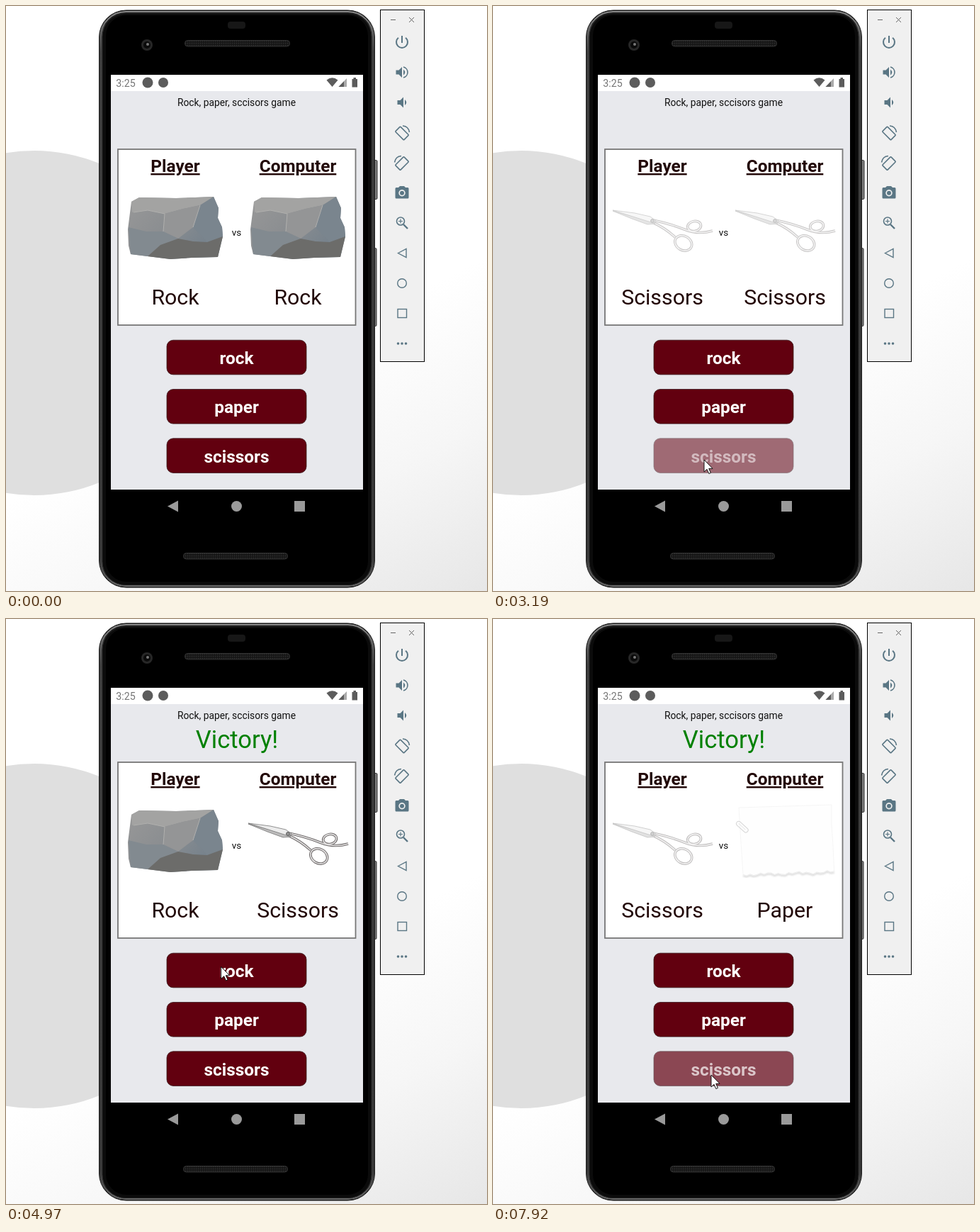
Recreate the animation shown at these times as an HTML page. Size 679x825 px, loop 8 s.

```html
<!DOCTYPE html>
<html lang="en">
<head>
<meta charset="utf-8">
<title>Rock, paper, scissors</title>
<style>
html, body { margin: 0; width: 100%; height: 100%; overflow: hidden; background: #fff; }
svg { display: block; width: 679px; height: 825px; }
text { font-family: Roboto, "Open Sans", sans-serif; text-anchor: middle; fill: #111; }
.head { font-size: 24.4px; font-weight: 700; text-decoration: underline; fill: #220808; }
.button text { font-size: 24.4px; font-weight: 700; fill: #fff; }
.button rect { fill: #62000f; stroke: #2b0c12; stroke-width: .7; }
.pick { font-size: 30.3px; fill: #220808; }
.line { fill: none; stroke: #5a7684; stroke-width: 1.6; }
.solid { fill: #5a7684; }
</style>
</head>
<body>
<svg viewBox="0 0 679 825">
  <defs>
    <linearGradient id="wall" gradientUnits="userSpaceOnUse" x1="530" y1="430" x2="720" y2="800">
      <stop offset="0" stop-color="#fff"/><stop offset=".5" stop-color="#f6f6f6"/><stop offset="1" stop-color="#e7e7e7"/>
    </linearGradient>
    <linearGradient id="rim">
      <stop offset="0" stop-color="#333"/><stop offset=".012" stop-color="#505050"/>
      <stop offset=".025" stop-color="#161616"/><stop offset=".975" stop-color="#161616"/>
      <stop offset=".988" stop-color="#505050"/><stop offset="1" stop-color="#333"/>
    </linearGradient>
    <linearGradient id="shine" x2="0" y2="1">
      <stop offset="0" stop-color="#8a8a8a"/><stop offset=".07" stop-color="#3c3c3c"/>
      <stop offset=".95" stop-color="#343434"/><stop offset="1" stop-color="#6a6a6a"/>
    </linearGradient>
    <linearGradient id="stone" x2="1" y2=".6">
      <stop offset="0" stop-color="#989898"/><stop offset=".5" stop-color="#8b8e91"/><stop offset="1" stop-color="#73808b"/>
    </linearGradient>
    <pattern id="mesh" width="3" height="3" patternUnits="userSpaceOnUse">
      <rect width="3" height="3" fill="#161616"/><circle cx="1.5" cy="1.5" r=".8" fill="#333"/>
    </pattern>
    <filter id="soft"><feGaussianBlur stdDeviation="1"/></filter>

    <g id="Rock">
      <path fill="url(#stone)" d="M177 276 188 270 240 271 293 269 300 285 299 299 305 312 306 325 299 354 262 355 232 357 200 353 176 350 173 338 172 315Z"/>
      <path fill="#a3a3a2" d="M177 276 188 270 240 271 293 269 274 281 250 286 224 293 200 288 178 291Z"/>
      <path fill="#949596" d="M224 293 250 286 274 281 264 312 243 328 222 318Z"/>
      <path fill="#7a858e" d="M274 281 293 269 300 285 299 299 305 312 306 325 284 333 264 312Z"/>
      <path fill="#828a90" d="M173 312 198 318 222 318 243 328 218 337 200 353 176 350Z"/>
      <path fill="#6c6c6a" d="M200 353 218 337 243 328 264 332 284 333 306 325 299 354 262 355 232 357Z"/>
      <path fill="none" stroke="#b0b0ae" d="M180 291 200 288 224 293 222 318M264 312 274 281"/>
    </g>
    <g id="Paper">
      <path class="torn" fill="none" stroke="#aaa" stroke-width="2.5" filter="url(#soft)" transform="translate(0 1.5)"/>
      <path id="sheet" fill="#fefefe" stroke="#e9e9e9"/>
      <path class="torn" fill="none" stroke="#d2d2d2" stroke-width=".8"/>
      <g fill="none" stroke="#a0a0a0" transform="rotate(42 179 293)">
        <rect x="169" y="290" width="20" height="6.5" rx="3.2"/><path d="M172 293H185" stroke="#ccc"/>
      </g>
    </g>
    <path id="arms" d="M226 302Q250 307 270 315T310 317M225 305Q243 313 257 326"/>
    <g id="rings">
      <ellipse cx="284" cy="310.500" rx="9.500" ry="7" transform="rotate(-12 284 310)"/>
      <ellipse cx="269" cy="334.500" rx="12.500" ry="10" transform="rotate(30 269 334)"/>
    </g>
    <g id="Scissors" fill="none">
      <g stroke="#6f6b6b" stroke-width="3.6"><use href="#arms"/><use href="#rings"/></g>
      <g stroke="#e4e2e2" stroke-width="1.6"><use href="#arms"/><use href="#rings"/></g>
      <path fill="#bdbcbc" stroke="#777" stroke-width=".8" d="M169 289 196 300 218 308 229 307 222 303Z"/>
      <path fill="#ececec" stroke="#777" stroke-width=".8" d="M169 288 200 292 222 297 230 303 226 306Z"/>
      <circle cx="225" cy="303" r="2.4" fill="#999" stroke="#555"/>
    </g>
  </defs>

  <rect width="679" height="825" fill="url(#wall)"/>
  <circle cx="40" cy="447" r="243" fill="#dfdfdf"/>

  <!-- phone -->
  <g fill="#808080" stroke="#2c2c2c">
    <rect x="517" y="217.500" width="7" height="55" rx="1.500"/>
    <rect x="517" y="341.500" width="6" height="110" rx="1.500"/>
    <path d="M520.500 566V604"/>
  </g>
  <rect x="131.500" y="6" width="389" height="814" rx="38" fill="url(#rim)" stroke="#1c1c1c"/>
  <rect x="133.500" y="8" width="385" height="810" rx="36" fill="none" stroke="url(#shine)" stroke-width="2"/>
  <rect x="136" y="10.500" width="380" height="806" rx="33" fill="#0b0b0b" stroke="#222"/>
  <rect x="141" y="13" width="370" height="799" rx="29"/>
  <rect x="313" y="22" width="25" height="10" rx="4" fill="#171717"/>
  <rect x="252.500" y="48.500" width="148" height="8.500" rx="4" fill="url(#mesh)" stroke="#333"/>
  <rect x="250.500" y="771.500" width="147" height="8.500" rx="4" fill="url(#mesh)" stroke="#333"/>
  <circle cx="199" cy="55" r="8" fill="#272727"/><circle cx="199" cy="55" r="5" fill="#0a0a0a"/>
  <circle cx="200" cy="54" r="2" fill="#777"/>
  <g fill="#9a9a9a">
    <path d="M228 705.500 243 697.500V713.500Z"/><circle cx="325.500" cy="705.500" r="7.500"/>
    <rect x="407" y="698" width="15" height="15"/>
  </g>

  <!-- app -->
  <rect x="148" y="97" width="356" height="585" fill="#e8e9ed"/>
  <rect x="148" y="97" width="356" height="23" fill="#fff"/>
  <text x="169" y="113.500" font-size="14.200" style="fill:#757575">3:25</text>
  <g fill="#5c5c5c">
    <circle cx="200" cy="108" r="7.500"/><circle cx="222" cy="108" r="7"/>
    <path d="M452.500 104.500Q460.500 98 468.500 104.500L460.500 114Z"/>
    <path d="M469.500 114H481V102Z" fill="#aaa"/><path d="M469.500 114H477V106.300Z"/>
    <path d="M488.500 103H490.500V101H494V103H496V114.500H488.500Z"/>
  </g>
  <text x="325.500" y="140.500" font-size="13.840">Rock, paper, sccisors game</text>
  <text id="result" x="326" y="181.500" font-size="34.600" style="fill:#008000">Victory!</text>
  <rect x="158" y="202" width="335.500" height="248" fill="#fff" stroke="#777" stroke-width="1.800"/>
  <text class="head" x="239" y="234">Player</text>
  <text class="head" x="412" y="234">Computer</text>
  <text x="325.500" y="324" font-size="13.500">vs</text>
  <use class="photo"/><use class="photo" x="173"/>
  <text class="pick" x="239" y="421"></text>
  <text class="pick" x="412" y="421"></text>
  <g id="buttons"></g>

  <!-- emulator panel -->
  <rect x="528.500" y="5.500" width="62" height="496" fill="#f0f0f0" stroke="#000"/>
  <path stroke="#666" fill="none" d="M543 19.500H550M569 16 576 23M576 16 569 23"/>
  <path class="line" transform="translate(559 51)" style="stroke-width:2" d="M0-9V1M-5.100-6.200A8 8 0 1 0 5.100-6.200"/>
  <g transform="translate(559 93.500)">
    <path class="solid" d="M-8.500-3H-4.500L0-7.500V7.500L-4.500 3H-8.500ZM2-4Q6.500 0 2 4Z"/>
    <path class="line" d="M2-7.500A7.700 7.700 0 0 1 2 7.500"/>
  </g>
  <path class="solid" transform="translate(559 136)" d="M-6.500-3H-2.500L2-7.500V7.500L-2.500 3H-6.500ZM4-4Q8.500 0 4 4Z"/>
  <g id="turn" class="line">
    <rect x="-5" y="-8.500" width="10" height="17" rx="1" transform="translate(559 179.500) rotate(-45)"/>
    <path d="M560 169Q568 169.500 569.500 178"/>
  </g>
  <use href="#turn" transform="translate(1118 42.500) scale(-1 1)"/>
  <g transform="translate(559 263)">
    <path class="solid" d="M-3-9H3L5-7H8Q9.500-7 9.500-5.500V7Q9.500 8.500 8 8.500H-8Q-9.500 8.500-9.500 7V-5.500Q-9.500-7-8-7H-5Z"/>
    <circle cy=".8" r="4.700" fill="#f0f0f0"/><circle class="solid" cy=".8" r="3"/>
  </g>
  <g class="line">
    <circle cx="557" cy="303.500" r="5.500"/><path d="M561 308 567 314" style="stroke-width:2.400"/>
    <path d="M554 303.500H560M557 300.500V306.500" style="stroke-width:1.200"/>
    <path d="M553.500 348.500 565 342.500V354.500Z" style="stroke-width:1.400"/>
    <circle cx="559" cy="391" r="6.300" style="stroke-width:1.400"/>
    <rect x="553" y="427.500" width="12.500" height="12" style="stroke-width:1.400"/>
  </g>
  <g class="solid"><circle cx="553.500" cy="476" r="1.800"/><circle cx="559" cy="476" r="1.800"/><circle cx="564.500" cy="476" r="1.800"/></g>

  <path id="cursor" d="M0 0V17L4 13.300 6.800 19.500 9.400 18.400 6.700 12.300H12Z" fill="#fff" stroke="#000" stroke-width=".9"/>
</svg>
<script>
const LOOP = 8000, TICK = 77.25, PHASE = 880;
const all = s => [...document.querySelectorAll(s)];
const id = s => document.getElementById(s);
const clamp = v => Math.min(1, Math.max(0, v));
const ease = v => (v = clamp(v)) < .5 ? 2 * v * v : 1 - 2 * (1 - v) ** 2;

// press: touch down, set: choice shown, out: button released, load: pictures fade in
const clicks = [
  { button: 1, press: 1503, set: 1590, out: 1590, load: 1685, picks: ['Paper', 'Paper'] },
  { button: 2, press: 2930, set: 3082, out: 3082, load: 3085, picks: ['Scissors', 'Scissors'] },
  { button: 0, press: 4090, set: 4243, out: 4243, load: 4250, picks: ['Rock', 'Scissors'], win: true },
  { button: 1, press: 5785, set: 5800, out: 5915, load: 5815, picks: ['Paper', 'Rock'], win: true },
  { button: 2, press: 7590, set: 7770, out: 7770, load: 7778, picks: ['Scissors', 'Paper'], win: true }
];
const start = { set: -1000, load: -1000, picks: ['Rock', 'Rock'] };

// time, x, y of the pointer tip
const path = [
  [200, 621, 816], [880, 325, 493], [1050, 325, 493], [1340, 291, 555],
  [2380, 291, 555], [2890, 298, 640], [3600, 298, 640], [4080, 305, 488],
  [4910, 305, 488], [5350, 274, 545], [5740, 285, 563], [5900, 285, 563],
  [6600, 314, 643], [6830, 308, 643], [LOOP, 308, 643]
];

id('buttons').innerHTML = ['rock', 'paper', 'scissors'].map((label, i) =>
  `<g class="button" transform="translate(0 ${i * 69.3})">
    <rect x="227" y="471.2" width="197" height="48.6" rx="9"/>
    <text x="325.5" y="505">${label}</text></g>`).join('');

const torn = Array.from({ length: 27 }, (_, i) =>
  `${180 + i * 4.95} ${(360.5 - i * .15 + Math.sin(i * 2.3) * 1.3 + Math.sin(i * .7)).toFixed(1)}`).join('L');
all('.torn').forEach(p => p.setAttribute('d', 'M' + torn));
id('sheet').setAttribute('d', `M305 262 174 266 176 300 178 330 L${torn} 307 320 305 290Z`);

const photos = all('.photo'), labels = all('.pick');
const buttons = all('.button').map(b => [...b.children]);

function buttonOpacity(i, t) {
  const c = clicks.findLast(c => c.button === i && c.press <= t);
  if (!c) return 1;
  const low = 1 - .8 * ease((Math.min(t, c.out) - c.press) / 150);
  return low + (1 - low) * ease((t - c.out) / 250);
}

function moveCursor(t) {
  const cursor = id('cursor'), k = path.findLastIndex(p => p[0] <= t);
  cursor.setAttribute('visibility', k < 0 ? 'hidden' : 'visible');
  if (k < 0) return;
  const [t0, x0, y0] = path[k], [t1, x1, y1] = path[k + 1] || [t0 + 1, x0, y0];
  const f = ease((t - t0) / (t1 - t0));
  cursor.setAttribute('transform', `translate(${x0 + (x1 - x0) * f} ${y0 + (y1 - y0) * f})`);
}

function draw(time) {
  // the screen refreshes in even steps
  const t = PHASE + Math.floor((time - PHASE + 12) / TICK) * TICK;

  const states = [start, ...clicks].filter(c => c.set <= t);
  const state = states.at(-1), before = states.at(-2);
  state.picks.forEach((pick, i) => {
    const kept = before && before.picks[i] === pick;
    photos[i].setAttribute('href', '#' + pick);
    photos[i].setAttribute('opacity', kept ? 1 : clamp((t - state.load) / 300));
    labels[i].textContent = pick;
  });
  id('result').setAttribute('visibility', state.win ? 'visible' : 'hidden');
  // face and label fade separately, so the face shows through the label
  buttons.forEach((parts, i) => parts.forEach(p => p.setAttribute('opacity', buttonOpacity(i, t))));
  moveCursor(t);
}

const begin = performance.now();
(function play() {
  draw((performance.now() - begin) % LOOP);
  requestAnimationFrame(play);
})();
</script>
</body>
</html>
```
